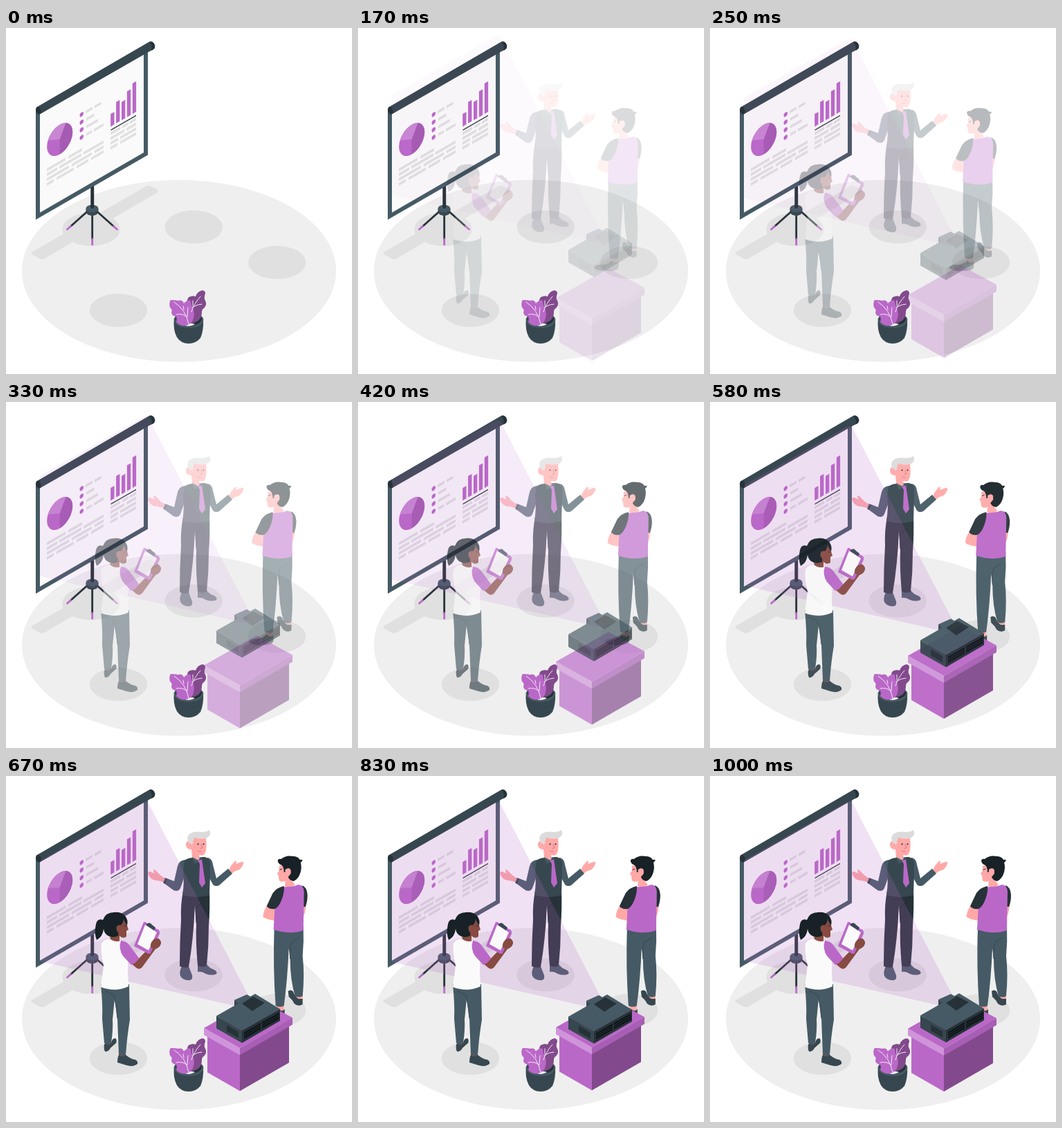
Recreate the animation shown at these times as an HTML page. Size 500 by 500 pixels, loop 1.04 s.

```html
<!DOCTYPE html>
<html lang="en">
<head>
<meta charset="utf-8">
<title>Presentation</title>
<style>
html, body { margin: 0; width: 100%; height: 100%; overflow: hidden; background: #fff; }
svg { display: block; width: 100%; height: 100%; }
.purple { fill: #ba68c8; }
.plum { fill: #824a8c; }
.slate { fill: #455a64; }
.steel { fill: #37474f; }
.dark { fill: #263238; }
.hair { fill: #172126; }
.pink { fill: #ffa8a7; }
.brown { fill: #874a42; }
.shade { fill: #e0e0e0; }
.white { fill: #fafafa; }
.line { fill: none; stroke-linecap: round; stroke-linejoin: round; }
</style>
</head>
<body>
<svg viewBox="0 0 500 500">
  <g id="floor">
    <ellipse cx="250" cy="351" rx="227" ry="131.5" fill="#efefef"/>
    <g class="shade">
      <ellipse cx="271.2" cy="287.5" rx="41.7" ry="24"/>
      <ellipse cx="391.7" cy="338.8" rx="41.7" ry="24"/>
      <ellipse cx="162.5" cy="408" rx="41.7" ry="24"/>
      <ellipse cx="123" cy="291" rx="41.7" ry="24"/>
      <path d="M37 324 202 229Q206 227 210 229L218 233Q222 235 218 238L56 333Q52 335 48 333L39 328Q35 326 37 324Z"/>
    </g>
  </g>

  <g id="screen">
    <g class="line" stroke-width="2.8">
      <path stroke="#263238" d="M121 262 93 287M124.7 262V305M128 262 156 287"/>
      <path stroke="#ba68c8" d="M93.500 286.500 88.500 291M124.700 305V313M155.500 286.500 160.500 291"/>
    </g>
    <path class="steel" d="M115.500 261V266Q117 271 124.700 271Q132 271 133.500 266V261Z"/>
    <ellipse class="slate" cx="124.500" cy="261" rx="9" ry="5.500"/>
    <path class="dark" d="M122.300 225H127.200V259Q124.700 262 122.300 259Z"/>
    <path class="slate" d="M43 119 205 30V183.500L43 277Z"/>
    <path class="white" d="M49 122 199 36V180L49 266.700Z"/>
    <g id="slide" transform="skewY(-30)"></g>
    <path class="steel" d="M45 114 206 20.500Q211 17.500 214 22.500Q217 28 213 31L207 34 50 124Q44 126 43 119Z"/>
    <ellipse class="dark" cx="47" cy="119.300" rx="3.600" ry="5.600" transform="rotate(-20 47 119.300)"/>
    <path class="dark" d="M207 20Q211 18 214 22.500Q217 28 213 31L210 32.500Q213 26 207 20Z"/>
  </g>

  <g data-enter="0 0">
    <path class="slate" d="M254 275Q250 283 252 289Q256 296 266 295Q270 294 269 288L264 275ZM277 273V283Q283 282 289 286Q298 289 304 286Q306 283 301 280Q293 277 290 272Z"/>
    <path class="dark" d="M256 166H294Q295 190 293 217Q293 246 290 274Q284 277 277 274Q274 242 275 212L273 187Q271 235 264 276Q258 278 251 275Q251 240 253 207Q252 186 256 166Z"/>
    <path d="M275 212 274 190 284 184" class="line" stroke="#1a2429"/>
    <path class="pink" d="M231 148Q223 145 218 138Q214 134 213 136Q213 139 215 141L208 138Q203 138 207 145Q211 151 219 151L230 154ZM322 136Q325 129 329 125Q332 121 333 124L332 127 341 124Q345 124 342 129Q339 136 332 137L326 141Z"/>
    <path class="slate" d="M259 121Q250 122 248 130L243 152 230 147 227 154 242 165Q249 168 252 162L261 137ZM291 118Q298 119 299 128L304 148 321 134 327 141 308 158Q301 161 298 155L289 138Z"/>
    <path class="steel" d="M258 122Q263 118 271 118L287 117Q295 119 295 126Q295 149 294 172Q276 178 255 172Q258 153 256 136Z"/>
    <path class="pink" d="M263 94Q266 86 277 87L289 89Q291 107 287 113Q285 116 279 114L280 121Q273 123 269 118L268 106Q261 106 260 100Q260 95 263 94Z"/>
    <path class="slate" d="M269 117 278 122 281 118 284 120 283 126 278 123 273 127Z"/>
    <path class="purple" d="M277 122 283 121 284 127 288 155 283 161 279 154 280 127Z"/>
    <path fill="#dbdbdb" d="M264 97Q260 87 265 84Q271 79 282 81Q291 81 294 78Q298 86 289 90Q279 92 272 89Q270 93 270 98L267 99Q267 95 264 97Z"/>
    <g class="dark"><circle cx="277.500" cy="98.500" r="1.100"/><circle cx="285.500" cy="98.500" r="1.100"/></g>
    <path class="line" stroke="#d97c80" d="M282 99 283.500 104 281 104.500M277 108Q279 110.500 282 109"/>
    <path class="line" stroke="#263238" stroke-width="1.500" d="M232 149 229 155"/>
  </g>

  <g data-enter="-30 0">
    <path class="pink" d="M390 328H401V341H391ZM417 315H428V324H417Z"/>
    <path class="steel" d="M392 336Q385 343 376 342Q367 342 366 347Q374 352 386 351Q399 352 402 346V337Q397 342 392 336Z"/>
    <path class="steel" d="M407 311Q410 308 414 311Q417 319 422 322L428 322V330Q422 334 416 329Q413 323 408 319Z"/>
    <path class="slate" d="M387 217H429Q430 239 428 260Q431 287 428 318Q423 321 417 318Q410 294 410 265L408 249Q406 295 401 332Q396 335 389 332Q385 278 387 217Z"/>
    <path class="line" stroke="#37474f" d="M410 264Q409 246 412 240L423 234"/>
    <path class="pink" d="M376 188Q370 198 371 204Q377 208 389 209L388 191ZM428 186H433Q432 200 428 204Z"/>
    <path class="dark" d="M427 158Q434 160 435 172Q435 182 432 189H427Z"/>
    <path class="pink" d="M394 130 407 126 412 139V151L417 157Q411 163 402 159L403 152Q396 154 394 151L393 144 391 141 394 137Z"/>
    <path class="purple" d="M398 160Q411 161 422 157Q429 157 430 167L429 223Q410 230 386 222L388 185Z"/>
    <path class="dark" d="M401 159Q391 161 385 169L376 188Q379 193 388 192Q394 189 398 178Q402 167 401 159Z"/>
    <path class="hair" d="M392 122Q393 119 397 120Q404 114 414 116Q421 116 424 121L428 121Q427 124 425 125Q427 131 425 139Q422 149 415 152Q409 151 407 146L411 141Q411 134 406 134Q404 135 404 139L401 139Q401 132 398 129Q392 127 392 122Z"/>
    <path class="pink" d="M403 135Q409 131 411 136Q411 144 405 144Q402 143 403 135Z"/>
    <path class="line" stroke="#263238" d="M395 135.500 398 134.500"/>
  </g>

  <path data-enter="0 -30" fill="#ba68c8" fill-opacity=".2" d="M49 122 199 37 205 37 352 320 346 335 49 267Z"/>

  <g data-enter="0 0">
    <path class="brown" d="M143 382H152V392H143ZM163 398H173V408H163Z"/>
    <path class="steel" d="M144 386Q148 391 152 386Q153 379 158 379Q161 381 159 386L151 393Q148 399 143 398Q141 394 142 388ZM163 403Q168 407 173 403Q180 409 187 410Q191 412 190 416Q184 421 174 418L161 414Q161 407 163 403Z"/>
    <path class="slate" d="M137 301H178L179 352Q175 376 173 403Q168 405 163 402L161 351 157 322 154 352Q155 366 152 386Q147 389 142 386L139 351Q140 331 137 301Z"/>
    <path class="line" stroke="#37474f" d="M161 350Q159 325 155 316L144 311"/>
    <path class="brown" d="M151 228H164V239Q157 244 150 238ZM185 271 208 247Q209 238 214 235Q221 232 224 240Q224 247 216 250L197 276Q193 281 188 277L174 265Z"/>
    <path class="white" d="M150 235Q157 241 166 238Q175 240 177 252L176 285 177 304Q159 313 137 305L141 274Q136 252 138 242Q141 236 150 235Z"/>
    <path class="purple" d="M166 238Q173 238 178 244L192 263Q189 269 181 273L169 260Q162 249 166 238Z"/>
    <path class="purple" d="M199 211Q200 210 203 212L221 223Q223 225 222 228L209 256Q207 258 204 256L187 247Q184 246 186 243Z"/>
    <path class="white" d="M201 215 218 226 206 252 190 243Z"/>
    <path class="steel" d="M202 215 205 213Q208 211 211 215L216 219 214 223Z"/>
    <path class="brown" d="M209 248Q208 240 214 236Q221 232 224 240Q224 247 216 250Z"/>
    <path class="brown" d="M156 210 174 207 175 216 177 222 174 224 174 232Q169 236 164 231Q154 233 151 225Z"/>
    <path class="hair" d="M140 208Q144 197 156 197Q166 196 172 202Q177 208 175 216Q172 212 170 207Q169 214 165 216Q160 216 160 222Q163 226 162 231Q153 235 146 230Q142 227 141 221Q140 232 131 237Q127 228 130 214Q132 205 140 208Z"/>
    <path class="brown" d="M160 217Q165 213 168 218Q168 224 163 226Q158 224 160 217Z"/>
    <path class="line" stroke="#263238" d="M171 217 174 216.500"/>
  </g>

  <g data-enter="0 30">
    <path class="purple" d="M291 368 338 395V456L291 429Z"/>
    <path class="plum" d="M338 395 409 353V415L338 456Z"/>
    <path class="purple" d="M286 365 362 322 414 350 338 394Z"/>
    <path fill="#cf94d9" d="M286 365 338 394V404L286 375Z"/>
    <path fill="#a85eb5" d="M338 394 414 350V360L338 404Z"/>
  </g>

  <g data-enter="0 -30">
    <path class="steel" d="M330 323 336 327V334L330 331Z"/>
    <path class="slate" d="M330 323 348 315 355 319 337 329Z"/>
    <path class="dark" d="M337 329 355 319V324L337 335Z"/>
    <path class="slate" d="M304 346 360 314 396 336 341 367Z"/>
    <path class="steel" d="M304 346 341 367V385L304 364Z"/>
    <path class="dark" d="M341 367 396 336V353L341 385Z"/>
    <path class="dark" d="M341 328 357 318 374 327 356 339Z"/>
    <path class="dark" d="M319 359 336 369V378L319 368Z"/>
    <g fill="#0d1417"><path d="M344 370 368 356V365L344 379ZM370 355 395 341V350L370 364Z"/></g>
    <path class="line" stroke="#37474f" stroke-width=".6" d="M344 373 368 359M344 376 368 362M370 358 395 344M370 361 395 347"/>
  </g>

  <g id="plant">
    <path class="steel" d="M243 419H285Q286 437 281 448Q274 456 264 456Q253 456 247 447Q241 436 243 419Z"/>
    <ellipse class="slate" cx="264" cy="422" rx="21.300" ry="11.500"/>
    <ellipse class="dark" cx="264" cy="420.500" rx="19" ry="9.500"/>
    <path class="white" d="M256 429Q264 424 273 428Q265 433 256 429Z"/>
    <path class="plum" d="M263 426Q260 409 263 402Q260 393 264 389Q269 386 274 388Q276 381 284 379Q290 380 287 387Q286 391 288 394Q291 400 286 405Q283 406 283 411Q283 420 276 424Q269 428 263 426Z"/>
    <path class="purple" d="M259 430Q251 431 246 425Q247 420 246 417Q239 416 239 411Q241 407 237 404Q235 397 238 393Q244 393 249 394Q255 392 257 398Q262 392 267 394Q267 401 270 405Q273 412 271 419Q270 428 259 430Z"/>
    <path class="line" stroke="#f6e8f8" d="M264 428Q260 407 243 396M262 417 263 404M262 418Q256 412 246 414M257 407 256 402M268 410Q272 398 281 388M270 402 270 394M269 404Q276 399 283 399"/>
  </g>
</svg>
<script>
const LOOP = 1040, FPS = 24;

function drawSlide() {
  const dots = [188, 199, 210, 221];
  const textRows = [
    [188, 115, 125], [188, 128, 137.5], [199, 116, 127.5], [210, 116, 133],
    [221, 116, 124], [221, 127, 141],
    [239, 59, 86], [239, 90, 110], [246, 59, 74], [246, 77, 109], [246, 112, 141],
    [253, 59, 91], [253, 95, 124], [253, 128, 141],
    [260, 59, 69], [260, 73, 98], [260, 102, 119], [260, 123, 141],
    [240, 151, 165], [240, 168, 177], [240, 179, 188], [247, 151, 171], [247, 174, 188],
    [254, 151, 162], [254, 165, 188], [261, 151, 161], [261, 165, 188]
  ];
  const barTops = [211.6, 198.8, 203.3, 192.5, 185.6];
  const rows = textRows.map(([y, from, to]) => `M${from} ${y}H${to}`).join('');
  document.getElementById('slide').innerHTML =
    `<path d="${rows}" stroke="#e0e0e0" stroke-width="4"/>` +
    dots.map(y => `<ellipse class="purple" cx="109.3" cy="${y}" rx="2.8" ry="3.2"/>`).join('') +
    barTops.map((y, i) =>
      `<rect class="purple" x="${151.2 + 7.9 * i}" y="${y}" width="5.3" height="${229.7 - y}"/>`).join('') +
    '<path d="M151.500 235H188" stroke="#263238" stroke-width="1.500"/>' +
    '<g transform="translate(77.7 205.9)"><ellipse class="purple" rx="18.5" ry="21.4"/>' +
    '<path fill="#c886d3" d="M0 0-17-8.700A18.500 21.400 0 0 1 9-18.700Z"/>' +
    '<path fill="#a55bb2" d="M0 0 9-18.700A18.500 21.400 0 0 1 0 21.400Z"/></g>';
}

const bezier = (s, a, b) => 3 * (1 - s) ** 2 * s * a + 3 * (1 - s) * s * s * b + s ** 3;

// cubic-bezier(.36, -.01, .5, 1.38): a slight overshoot before settling
function ease(x) {
  let low = 0, high = 1;
  for (let i = 0; i < 24; i++) {
    const mid = (low + high) / 2;
    if (bezier(mid, .36, .5) < x) low = mid; else high = mid;
  }
  return bezier(low, -.01, 1.38);
}

const parts = [...document.querySelectorAll('[data-enter]')].map(node => {
  const [dx, dy] = node.dataset.enter.split(' ').map(Number);
  return { node, dx, dy };
});

function render(ms) {
  const step = Math.floor((ms % LOOP + 5) * FPS / 1000);
  const progress = step < 2 ? 0 : step >= FPS - 1 ? 1 : ease((step + 1) / FPS);
  const rest = 1 - progress;
  for (const { node, dx, dy } of parts) {
    node.setAttribute('opacity', Math.max(0, Math.min(1, progress)));
    node.setAttribute('transform', `translate(${dx * rest} ${dy * rest})`);
  }
}

drawSlide();
const start = performance.now();
function tick() {
  render(performance.now() - start);
  requestAnimationFrame(tick);
}
tick();
</script>
</body>
</html>
```
